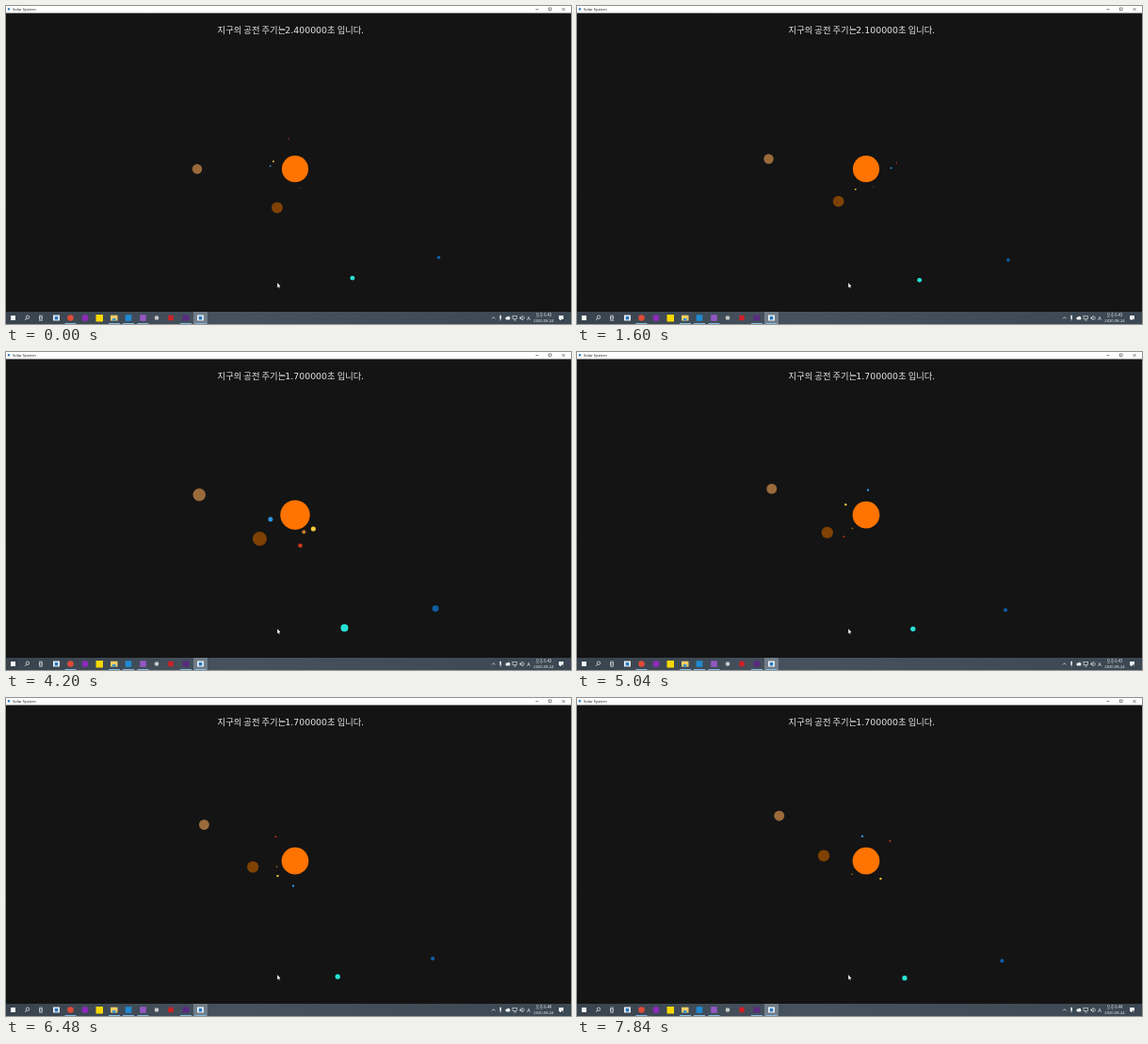
Animation, 600 px wide and 338 px high, one loop 7.88 s. Source, as an HTML page with a canvas:

```html
<!DOCTYPE html>
<html lang="ko">
<head>
<meta charset="utf-8">
<title>Solar System</title>
<style>
html, body { margin: 0; width: 100%; height: 100%; overflow: hidden; background: #141414; }
canvas { display: block; width: 600px; height: 338px; }
</style>
</head>
<body>
<canvas id="stage" width="600" height="338"></canvas>
<script>
const g = document.getElementById('stage').getContext('2d');
const LOOP = 7.88, SUN_X = 307, SUN_Y = 173.2;
const CJK = '"Noto Sans CJK KR", "Noto Sans CJK", sans-serif';
const UI = '"Noto Sans", "Noto Sans CJK KR", sans-serif';

// [time, value] pairs
const PERIOD = [[0, 2.4], [.9, 1.7], [1.6, 2.1], [2.5, 3.7], [3.04, 2.9], [3.78, 1.7]];
const SWELL = [[4, 0], [4.2, 1.6], [4.4, 1.7], [4.9, .25]];
const TURN = [[0, 0], [.45, 42.8], [.9, 93.5], [1.6, 171.3], [2.32, 196], [3.04, 222.2],
  [3.78, 292], [4.2, 343.6], [5.04, 447.8], [6.48, 627.7], [7.84, 794.7], [7.88, 799.6]];

// years per orbit, orbit radius, start angle, size, colour
const PLANETS = [
  [.2408, 20.4, 76, .5, '#c07a28'],
  [.6152, 24.4, 199, .95, '#f5c83a'],
  [1, 26.5, 186.6, .95, '#2a94dc'],
  [1.881, 33, 257.7, .7, '#c83a1c'],
  [11.02, 45.3, 114.9, 5.9, '#7f4204'],
  [28.9, 104, 180, 5.2, '#9a6a3a'],
  [83.7, 131, 62.3, 2.4, '#27e3d6'],
  [169, 179.2, 31.65, 1.8, '#0f5fa6']
];

function segment(keys, t) {
  let i = 0;
  while (i < keys.length - 2 && t >= keys[i + 1][0]) i++;
  return i;
}

function linear(keys, t) {
  const i = segment(keys, t), [t0, a] = keys[i], [t1, b] = keys[i + 1];
  return a + (b - a) * Math.min(1, Math.max(0, (t - t0) / (t1 - t0)));
}

function smooth(keys, t) {
  const i = segment(keys, t), [t0, a] = keys[i], [t1, b] = keys[i + 1], h = t1 - t0;
  const slope = k => {
    const p = keys[Math.max(0, k - 1)], q = keys[Math.min(keys.length - 1, k + 1)];
    return (q[1] - p[1]) / (q[0] - p[0]);
  };
  const u = (t - t0) / h, v = 1 - u;
  return a * v * v * (1 + 2 * u) + b * u * u * (3 - 2 * u)
    + h * u * v * (v * slope(i) - u * slope(i + 1));
}

function rect(x, y, w, h, color) {
  g.fillStyle = color;
  g.fillRect(x, y, w, h);
}

function disc(x, y, r, color) {
  g.fillStyle = color;
  g.beginPath();
  g.arc(x, y, r, 0, 7);
  g.fill();
}

function line(points, color, width = .8) {
  g.strokeStyle = color;
  g.lineWidth = width;
  g.beginPath();
  points.forEach(([x, y]) => g.lineTo(x, y));
  g.stroke();
}

function label(s, x, y, size, color, font = UI, align = 'left') {
  g.font = size + 'px ' + font;
  g.textAlign = align;
  g.fillStyle = color;
  g.fillText(s, x, y);
}

function random(seed) {
  return () => (seed = (seed * 16807) % 2147483647) / 2147483647;
}

function drawStars() {
  const rnd = random(271);
  for (let i = 0; i < 130; i++) {
    const x = rnd() * 600, y = 9 + rnd() * 314, a = .03 + rnd() * .1;
    rect(x, y, 1, 1, `rgba(170,190,170,${a})`);
  }
}

function drawWindowIcon(x, y, s) {
  rect(x, y, s, s * .85, '#e8eef4');
  rect(x + s * .25, y + s * .2, s * .5, s * .5, '#2878c0');
}

function drawTitleBar() {
  rect(0, 0, 600, 7.5, '#fff');
  drawWindowIcon(1, 1.5, 4);
  label('Solar System', 7, 5, 4.1, '#222');
  line([[562.5, 3.5], [565.5, 3.5]], '#444', .6);
  g.strokeRect(576.5, 2, 2.6, 2.6);
  line([[590.5, 2], [593.5, 5]], '#444', .6);
  line([[593.5, 2], [590.5, 5]], '#444', .6);
}

function drawHeading(t) {
  let p = Math.round(linear(PERIOD, t) * 10) / 10;
  if (p > 2.75) p -= 1e-6;
  label('지구의 공전 주기는', 224.6, 29, 9.3, '#e6e6e6', CJK);
  label(p.toFixed(6), 296.3, 29, 9.4, '#e6e6e6', '"DejaVu Sans", sans-serif');
  label('초 입니다.', 341, 29, 9.3, '#e6e6e6', CJK);
}

function drawPlanets(t) {
  const grow = linear(SWELL, t), turn = smooth(TURN, t);
  disc(SUN_X, SUN_Y, 14.1 + grow, '#ff7300');
  for (const [years, orbit, start, size, color] of PLANETS) {
    const a = (start + turn / years) * Math.PI / 180;
    disc(SUN_X + orbit * Math.cos(a), SUN_Y + orbit * Math.sin(a), size + grow, color);
  }
}

function drawCursor() {
  g.beginPath();
  [[288.2, 294.3], [288.2, 299.2], [289.3, 298.3], [290, 300], [290.7, 299.7], [290, 298], [291.5, 298]]
    .forEach(([x, y]) => g.lineTo(x, y));
  g.fillStyle = '#fff';
  g.fill();
}

function drawApps() {
  rect(199, 325, 15, 13, '#707d89');
  rect(5, 329, 5, 5, '#f4f6f8');
  g.strokeStyle = '#eee';
  g.lineWidth = .7;
  g.beginPath();
  g.arc(23, 330.7, 1.7, 0, 7);
  g.stroke();
  line([[21.8, 332], [20, 334]], '#eee', .7);
  g.strokeRect(35.5, 330.3, 3, 2.6);
  line([[35, 329], [39, 329]], '#eee', .6);
  line([[35, 334.3], [39, 334.3]], '#eee', .6);
  drawWindowIcon(50, 328.5, 7);
  disc(68.5, 331.5, 3.3, '#dc4b38');
  disc(84, 331.5, 3.5, '#8a2bb8');
  rect(95.5, 328, 7.5, 7.5, '#f8d800');
  rect(111, 328.7, 7.5, 5.8, '#f4cd62');
  rect(113, 332, 3.5, 2.5, '#3b95d8');
  rect(126.7, 328.2, 6.6, 6.6, '#1f8ad2');
  rect(142.2, 328.2, 6.6, 6.6, '#9356c4');
  disc(160, 331.5, 2.3, '#c8c8c8');
  rect(172.3, 328.8, 5.4, 5.4, '#cf2027');
  rect(187.5, 328.5, 7, 6, '#582b80');
  drawWindowIcon(203, 328.5, 7);
  for (const x of [68.5, 115, 130, 145.5, 191, 206.5]) rect(x - 6, 337, 12, 1, '#83b9df');
}

function drawTray(t) {
  const ink = '#edf0f2';
  line([[516, 332.4], [517.7, 330.7], [519.4, 332.4]], ink, .7);
  rect(524.3, 328.8, 1.6, 3.8, ink);
  line([[525.1, 332], [525.1, 334.5]], ink, .6);
  disc(531.8, 332, 1.4, ink);
  disc(533.6, 331.4, 1.7, ink);
  rect(531.8, 331.8, 3.4, 1.6, ink);
  g.strokeStyle = ink;
  g.lineWidth = .6;
  g.strokeRect(538, 329.5, 4.6, 3);
  line([[539, 334], [542, 334]], ink, .6);
  rect(545.5, 330.7, 1.5, 1.8, ink);
  line([[547, 330.7], [548.2, 329.3], [548.2, 334], [547, 332.5]], ink, .6);
  g.beginPath();
  g.arc(548, 331.6, 2.3, -.9, .9);
  g.stroke();
  label('A', 555, 333.7, 5.6, ink, UI, 'center');
  label(t < 5.3 ? '오후 6:43' : '오후 6:44', 571, 330.3, 4.2, ink, CJK, 'center');
  label('2020-08-24', 571, 336, 4.1, ink, UI, 'center');
  rect(587, 329, 5, 4, ink);
  rect(588, 333, 1.5, 1, ink);
  if (t > 3.1) {
    disc(591.5, 333.7, 1.7, '#34404b');
    label('1', 591.5, 335, 3.4, ink, UI, 'center');
  }
}

function drawTaskbar(t) {
  const fill = g.createLinearGradient(0, 0, 600, 0);
  fill.addColorStop(0, '#38434e');
  fill.addColorStop(.4, '#46525e');
  fill.addColorStop(1, '#3b4752');
  rect(0, 325, 600, 13, fill);
  drawApps();
  drawTray(t);
}

function frame(now) {
  const t = Math.floor(now / 40) * .04 % LOOP;
  rect(0, 0, 600, 338, '#141414');
  drawStars();
  drawHeading(t);
  drawPlanets(t);
  drawCursor();
  drawTitleBar();
  drawTaskbar(t);
}

let begin;
function tick(now) {
  begin ??= now;
  frame(now - begin);
  requestAnimationFrame(tick);
}
frame(0);
requestAnimationFrame(tick);
</script>
</body>
</html>
```
